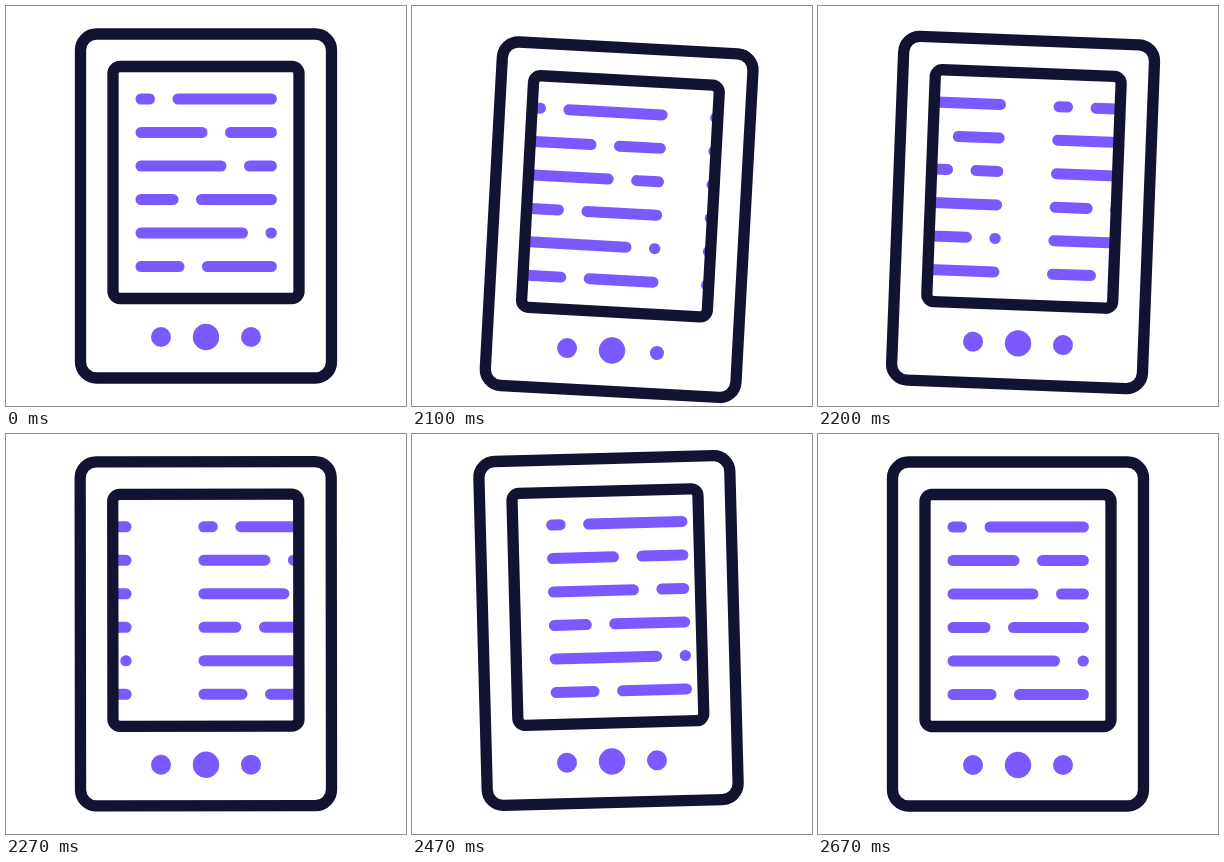
An HTML page that plays this animation: 400 px wide and 400 px high, repeating every 2700 ms.

```html
<!DOCTYPE html>
<html lang="en">
<head>
<meta charset="utf-8">
<title>E-reader page turn</title>
<style>
  html, body { margin: 0; height: 100%; overflow: hidden; background: #fff; }
  svg { display: block; width: 100%; height: 100%; }
  .frame { fill: none; stroke: #121331; stroke-width: 11.3; }
  .lines { fill: none; stroke: #7c59ff; stroke-width: 11; stroke-linecap: round; }
  circle { fill: #7c59ff; }
</style>
</head>
<body>
<svg viewBox="0 0 400 400">
  <defs>
    <clipPath id="screen"><rect x="107" y="60.5" width="186" height="232" rx="7"/></clipPath>
    <path id="page" class="lines"/>
  </defs>
  <g id="device">
    <g clip-path="url(#screen)">
      <use id="oldPage" href="#page"/>
      <use id="newPage" href="#page"/>
    </g>
    <rect class="frame" x="74.5" y="28" width="251" height="344" rx="16"/>
    <rect class="frame" x="107" y="60.5" width="186" height="232" rx="7"/>
    <circle cx="155" cy="331" r="10"/>
    <circle cx="200" cy="331" r="13.2"/>
    <circle id="button" cx="245" cy="331" r="10"/>
  </g>
</svg>
<script>
const LOOP = 2700, STEP = 25, TURN = 2000;
const $ = id => document.getElementById(id);

// Every text row is two dashes; these are the ends of the first ones.
const ends = [143.5, 196, 215, 167, 236.5, 173];
$('page').setAttribute('d', ends.map((x, i) => {
  const y = 93 + 33.5 * i;
  return `M135 ${y}H${x}M${x + 28.5} ${y}H265.4`;
}).join(''));

// Progress from 0 to 1 between two times; a skew below 1 makes an ease start faster.
const progress = (t, from, to) => Math.min(1, Math.max(0, (t - from) / (to - from)));
const ease = (t, from, to, skew = 1) => {
  const u = progress(t, from, to) ** skew;
  return u * u * (3 - 2 * u);
};

const move = (id, value) => $(id).setAttribute('transform', value);

function draw(time) {
  const t = time - TURN;
  // Swing one way, overshoot to the other side, settle.
  const settle = ease(t, 395, 660);
  const tilt = 3.7 * ease(t, 0, 133) - 5.65 * ease(t, 133, 395, .8) + 1.95 * settle;
  const drop = 14.5 * ease(t, 0, 125, .77) - 19 * ease(t, 125, 395, .62) + 4.5 * settle;
  move('device', `translate(0 ${drop}) rotate(${tilt} 200 331)`);
  move('oldPage', `translate(${-208 * ease(t, 0, 433)} 0)`);
  move('newPage', `translate(${232 * (1 - progress(t, 0, 667)) ** 2.45} 0)`);
  $('button').setAttribute('r', 10 - 4.2 * Math.sin(Math.PI * progress(t, 0, 133)));
}

// 40 poses per second, switched on a 10 ms clock.
const start = performance.now();
function tick() {
  const clock = Math.floor((performance.now() - start) % LOOP / 10) * 10;
  draw(Math.floor((clock + 5) / STEP) * STEP);
  requestAnimationFrame(tick);
}
tick();
</script>
</body>
</html>
```
